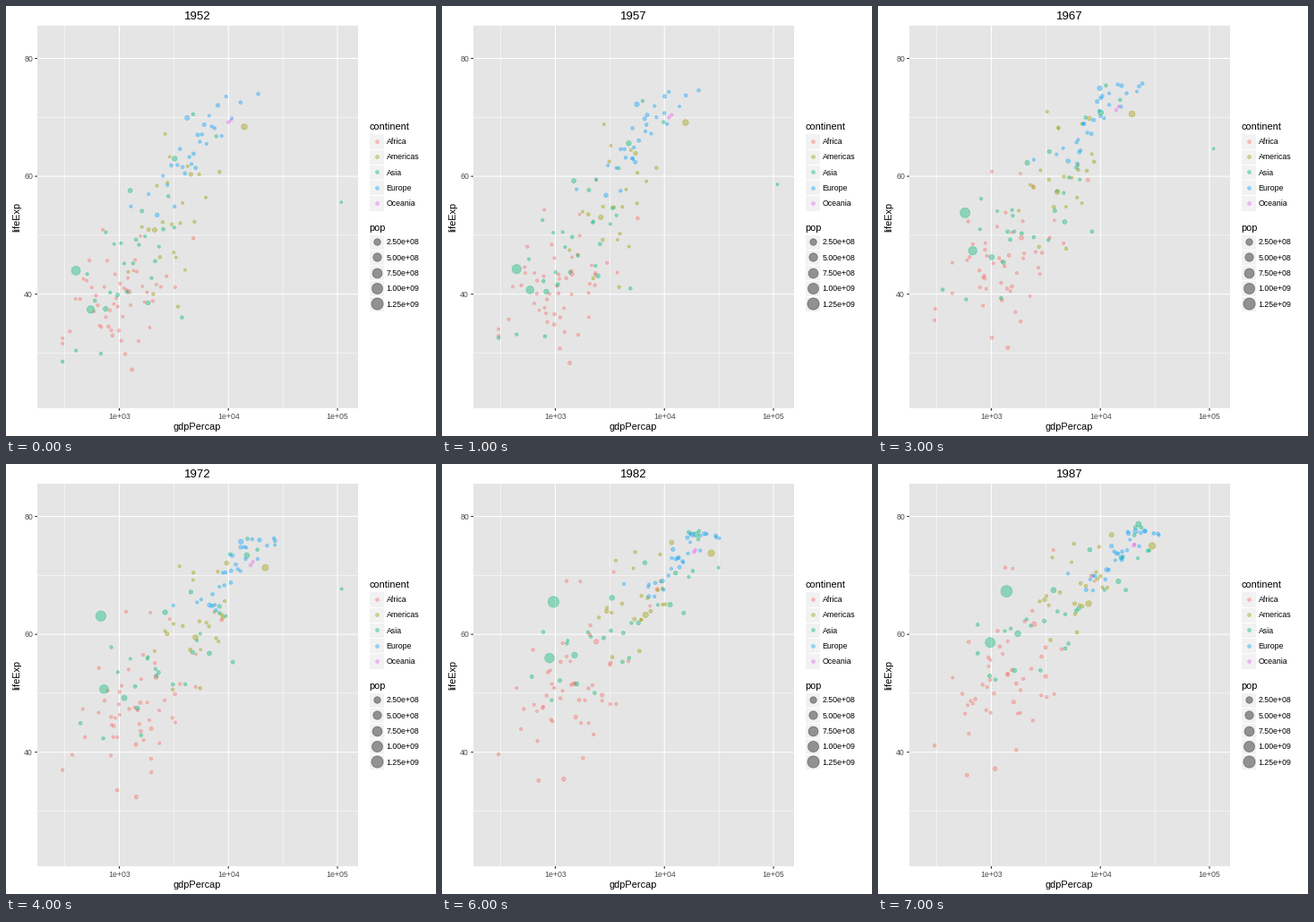
A matplotlib script for the animation above (8000 ms loop, 480x480 px).

```python
import numpy as np
import matplotlib.pyplot as plt
from matplotlib.animation import FuncAnimation
from matplotlib.patches import Rectangle

SIZE, DPI = 480, 100
PT = 72 / DPI                        # points per pixel
LEFT, RIGHT, TOP, BOTTOM = 35, 393, 22, 449
X_RANGE = (2.2487, 5.1887)           # log10 of gdpPercap
Y_RANGE = (20.649, 85.553)
STEPS, STEP_MS = 8, 1000
KEY_STEPS = (0, 2, 4, 7)             # steps at which cloud centres are given
ALPHA = 0.4
STROKE = 0.71
MAX_POP = 1318.7                     # millions
TURN = 0.1                           # how fast points change rank in a cloud

AFRICA, AMERICAS, ASIA = "#F8706A", "#9F9F08", "#08B876"
EUROPE, OCEANIA = "#10A4FA", "#E766F4"

rng = np.random.default_rng(1952)


def to_x(log_gdp):
    lo, hi = X_RANGE
    return LEFT + (log_gdp - lo) / (hi - lo) * (RIGHT - LEFT)


def to_y(life):
    lo, hi = Y_RANGE
    return BOTTOM - (life - lo) / (hi - lo) * (BOTTOM - TOP)


def pop_size(pop):
    return 1 + 5 * np.sqrt(pop / MAX_POP)


def marker_area(size):
    """Scatter area for a point size in millimetres."""
    return (0.75 * (2.845 * size + 0.945) * PT) ** 2


def spread(n):
    """Evenly stratified, shuffled values with a bell-shaped distribution."""
    u = (rng.permutation(n) + 0.5) / n
    return 0.55 * np.log(u / (1 - u))


def blend(ends, t):
    return np.interp(t, (0, STEPS - 1), ends)


class Cloud:
    """A continent's points, drifting and spreading around a moving centre."""

    def __init__(self, color, n, pop, growth, gdp, gdp_sd, life, life_sd, corr):
        self.colors = [color] * n
        self.growth, self.corr = growth, corr
        self.gdp, self.gdp_sd = gdp, gdp_sd
        self.life, self.life_sd = life, life_sd
        self.pops = np.minimum(pop * np.exp(spread(n)), 80)
        self.start = spread(n), spread(n)
        self.end = spread(n), spread(n)

    def at(self, t):
        u, v = (np.cos(TURN * t) * a + np.sin(TURN * t) * b
                for a, b in zip(self.start, self.end))
        r = blend(self.corr, t)
        v = r * u + np.sqrt(1 - r * r) * v
        gdp = np.interp(t, KEY_STEPS, self.gdp) + blend(self.gdp_sd, t) * u
        life = np.interp(t, KEY_STEPS, self.life) + blend(self.life_sd, t) * v
        # Life expectancy flattens out below a slowly rising ceiling.
        ceiling = 74 + 0.6 * t
        life = ceiling - 1.5 * np.logaddexp(0, (ceiling - life) / 1.5)
        pops = self.pops * self.growth ** (t - 4)
        return np.maximum(gdp, 2.48), life, pops


class Track:
    """One prominent point, led through (step, gdp, life) keys."""

    def __init__(self, color, pop, growth, *keys):
        self.colors = [color]
        self.pop, self.growth = pop, growth
        self.steps, gdps, self.lives = zip(*keys)
        self.gdps = np.log10(gdps)

    def at(self, t):
        return ([np.interp(t, self.steps, self.gdps)],
                [np.interp(t, self.steps, self.lives)],
                [self.pop * self.growth ** (t - 4)])


groups = [
    Cloud(AFRICA, 52, 4.8, 1.135, gdp=(2.99, 3.07, 3.15, 3.15),
          gdp_sd=(0.27, 0.35), life=(39.1, 43.3, 47.5, 53.3),
          life_sd=(5.2, 7.6), corr=(0.3, 0.55)),
    Cloud(AMERICAS, 23, 5.5, 1.12, gdp=(3.5, 3.6, 3.72, 3.78),
          gdp_sd=(0.2, 0.21), life=(53, 58.2, 62.2, 68),
          life_sd=(8.8, 5.4), corr=(0.5, 0.7)),
    Cloud(ASIA, 28, 11, 1.11, gdp=(3.14, 3.3, 3.5, 3.68),
          gdp_sd=(0.34, 0.5), life=(46.3, 52, 57.5, 65),
          life_sd=(9, 7.8), corr=(0.55, 0.78)),
    Cloud(EUROPE, 30, 8.5, 1.03, gdp=(3.69, 3.87, 4.05, 4.18),
          gdp_sd=(0.26, 0.22), life=(65, 69.2, 71.4, 74),
          life_sd=(6, 3.2), corr=(0.88, 0.85)),
    Cloud(OCEANIA, 2, 6, 1.09, gdp=(4.01, 4.1, 4.215, 4.31),
          gdp_sd=(0.02, 0.04), life=(69.4, 71.2, 72.1, 75.4),
          life_sd=(0.2, 1), corr=(0.5, 0.9)),
    Track(ASIA, 862, 1.1, (0, 400, 44), (2, 488, 44.5), (4, 677, 63.1),
          (6, 962, 65.5), (7, 1379, 67.3)),
    Track(ASIA, 567, 1.115, (0, 547, 37.4), (4, 724, 50.7), (7, 977, 58.6)),
    Track(ASIA, 121, 1.11, (0, 750, 37.5), (4, 1111, 49.2), (7, 1748, 60.1)),
    Track(ASIA, 107, 1.05, (0, 3217, 63), (4, 14779, 73.4), (7, 22376, 78.7)),
    Track(ASIA, 0.8, 1.3, (0, 108382, 55.6), (4, 109348, 67.7),
          (6, 31354, 71.3), (7, 28118, 74.2)),
    Track(AMERICAS, 210, 1.06, (0, 13990, 68.4), (4, 21806, 71.3),
          (7, 29884, 75)),
    Track(AMERICAS, 101, 1.14, (0, 2109, 50.9), (4, 4986, 59.5),
          (7, 7807, 65.2)),
]

fig = plt.figure(figsize=(SIZE / DPI, SIZE / DPI), dpi=DPI, facecolor="white")
ax = fig.add_axes([0, 0, 1, 1])
ax.set(xlim=(0, SIZE), ylim=(SIZE, 0))
ax.axis("off")


def text(x, y, s, size, color="black", **kw):
    return ax.text(x, y, s, fontsize=size * PT, color=color,
                   family="Liberation Sans", va="baseline", **kw)


def line(xs, ys, width, color="white"):
    ax.plot(xs, ys, color=color, lw=width * PT, solid_capstyle="butt",
            snap=False, zorder=2)


def dots(x, y, areas, colors):
    return ax.scatter(x, y, s=areas, c=colors, edgecolors=colors, alpha=ALPHA,
                      linewidths=STROKE * PT, zorder=3)


def draw_panel():
    ax.add_patch(Rectangle((LEFT, TOP), RIGHT - LEFT, BOTTOM - TOP,
                           fc="#E5E5E5", lw=0))
    for v in (2.5, 3.5, 4.5):
        line([to_x(v)] * 2, [TOP, BOTTOM], 0.53)
    for v in (30, 50, 70):
        line([LEFT, RIGHT], [to_y(v)] * 2, 0.53)
    for v in (3, 4, 5):
        x = to_x(v)
        line([x, x], [TOP, BOTTOM], 1.07)
        line([x, x], [BOTTOM, BOTTOM + 2.75], 1.07, "#333333")
        text(x, 461, f"1e+0{v}", 8.8, "#4D4D4D", ha="center")
    for v in (40, 60, 80):
        y = to_y(v)
        line([LEFT, RIGHT], [y, y], 1.07)
        line([LEFT - 2.75, LEFT], [y, y], 1.07, "#333333")
        text(30, y + 3.2, str(v), 8.8, "#4D4D4D", ha="right")
    text(213.5, 473, "gdpPercap", 11, ha="center")
    text(15, 235, "lifeExp", 11, ha="center", rotation=90,
         rotation_mode="anchor")


def draw_legend(title, baseline, first, labels, areas, colors):
    key = 17.28
    text(405, baseline, title, 11)
    for i, label in enumerate(labels):
        y = first + i * key
        ax.add_patch(Rectangle((405, y - key / 2), key, key, fc="#F2F2F2",
                               ec="white", lw=1.07 * PT))
        dots([413.7], [y], [areas[i]], [colors[i]])
        text(424.5, y + 3.2, label, 8.8)


draw_panel()
draw_legend("continent", 138, 150.9,
            ["Africa", "Americas", "Asia", "Europe", "Oceania"],
            [marker_area(1.5)] * 5,
            [AFRICA, AMERICAS, ASIA, EUROPE, OCEANIA])
pops = [250, 500, 750, 1000, 1250]
draw_legend("pop", 251, 263.2, [f"{p * 1e6:.2e}" for p in pops],
            [marker_area(pop_size(p)) for p in pops], ["black"] * 5)

year = text(213.5, 15, "", 13.2, ha="center")
colors = [c for g in groups for c in g.colors]
blank = np.zeros(len(colors))
points = dots(blank, blank, blank + 1, colors)


def update(t):
    gdp, life, pop = np.hstack([np.array(g.at(t)) for g in groups])
    points.set_offsets(np.column_stack([to_x(gdp), to_y(life)]))
    points.set_sizes(marker_area(pop_size(pop)))
    year.set_text(str(1952 + 5 * t))
    return points, year


anim = FuncAnimation(fig, update, frames=STEPS, interval=STEP_MS,
                     repeat=True, repeat_delay=0)
plt.show()
```
